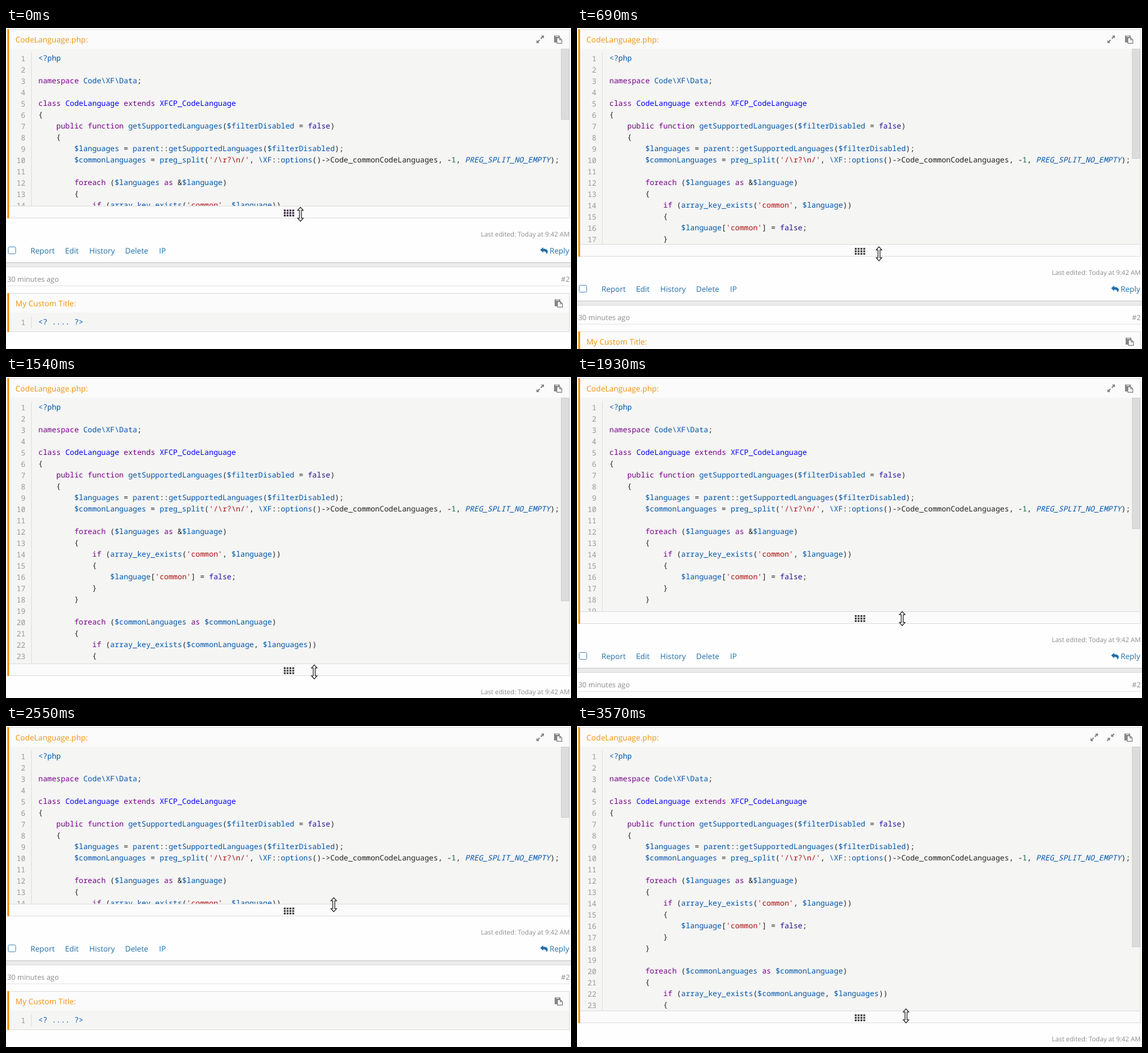
Animation of 899x511 px, one loop 3640 ms. Source, as an HTML page:

```html
<!DOCTYPE html>
<html lang="en">
<head>
<meta charset="utf-8">
<title>Resizable code block</title>
<style>
  html, body { margin: 0; width: 100%; height: 100%; overflow: hidden; background: #fefefe; }
  svg { display: block; width: 899px; height: 511px; }
  text { font-family: "Open Sans", "Noto Sans", sans-serif; text-rendering: geometricPrecision; white-space: pre; }
  .title { font-size: 12.4px; fill: #f2930d; }
  .link { font-size: 12.2px; fill: #1f6ea8; }
  .muted { font-size: 11.45px; fill: #8c8c8c; }
  .small { font-size: 10.4px; fill: #8c8c8c; }
  .end { text-anchor: end; }
  .code { font-family: "Noto Sans Mono", "DejaVu Sans Mono", monospace; font-size: 11.912px; fill: #222; }
  .number { fill: #999; text-anchor: end; }
  .keyword { fill: #708; }
  .string { fill: #a11; }
  .type { fill: #00f; }
  .atom { fill: #219; }
  .digit { fill: #164; }
  .variable { fill: #05a; }
  .constant { fill: #05a; font-style: italic; }
  .icon { fill: #858585; }
  .edge { fill: #dedede; }
  .head { fill: #fbfbfb; }
  .body { fill: #f5f5f4; }
  .accent { fill: #f2930d; }
</style>
</head>
<body>
<svg viewBox="0 0 899 511">
  <defs>
    <clipPath id="viewClip"><rect id="view" x="5" y="33" width="892" height="250"/></clipPath>
    <g id="outward">
      <path d="M6-6H1.2L6-1.2ZM-6 6H-1.2L-6 1.2Z"/>
      <path d="M1-1 4.5-4.5M-1 1-4.5 4.5" stroke="#858585" stroke-width="2"/>
    </g>
    <g id="inward">
      <path d="M.8-.8V-5.4L5.4-.8ZM-.8 .8V5.4L-5.4 .8Z"/>
      <path d="M2.5-2.5 5.5-5.5M-2.5 2.5-5.5 5.5" stroke="#858585" stroke-width="2"/>
    </g>
    <g id="paste">
      <path d="M-6-6H3V-3H-2V5H-6Z"/>
      <path d="M-4-4.6H1" stroke="#fbfbfb" stroke-width="1"/>
      <path d="M-1.4-2.4H3L6.4 1V6.4H-1.4ZM3-2.4V1H6.4" fill="#fbfbfb" stroke="#858585" stroke-width="1.2"/>
    </g>
  </defs>

  <rect class="edge" x="2" y="2" width="895" height="31"/>
  <rect class="head" x="5" y="3" width="891" height="30"/>
  <text class="title" x="15" y="23">CodeLanguage.php:</text>
  <g class="icon">
    <use id="expand" href="#outward" x="850" y="18"/>
    <use id="collapse" href="#inward" x="849" y="18"/>
    <use id="copy" href="#paste" x="878" y="18"/>
  </g>

  <g clip-path="url(#viewClip)">
    <rect class="body" x="5" y="33" width="891" height="478"/>
    <rect class="edge" x="896" y="33" width="1" height="478"/>
    <rect class="edge" x="40" y="39" width="1" height="472"/>
    <g id="listing"></g>
    <rect id="thumb" x="883.5" y="33.5" width="12" height="112" fill="#dcdcdc" stroke="#cfcfcf"/>
  </g>

  <g id="below">
    <rect class="edge" x="2" y="283" width="895" height="20"/>
    <rect class="head" x="5" y="284" width="891" height="18"/>
    <g id="grip"></g>
    <text class="small end" x="897" y="332">Last edited: Today at 9:42 AM</text>
    <rect x="3.5" y="348.5" width="12" height="11" rx="2" fill="#fff" stroke="#4f8fbe"/>
    <g class="link">
      <text x="39" y="359">Report</text>
      <text x="94" y="359">Edit</text>
      <text x="132.5" y="359">History</text>
      <text x="189.5" y="359">Delete</text>
      <text x="243.5" y="359">IP</text>
      <text x="865" y="359">Reply</text>
      <path d="M850 353.3 854.7 349V351.5C860 351.4 862 353.5 862 356 862 357.5 861 359 859.7 360 860.3 357 858.7 355.5 854.7 355.4V357.8Z"/>
    </g>
    <rect x="0" y="373" width="899" height="8" fill="#ebebeb"/>
    <rect x="0" y="373" width="899" height="1" fill="#c8c8c8"/>
    <rect x="0" y="380" width="899" height="1" fill="#dcdcdc"/>
    <text class="muted" x="2" y="404">30 minutes ago</text>
    <text class="muted end" x="897" y="404">#2</text>
    <rect x="2" y="410" width="895" height="1" fill="#e4e4e4"/>
    <rect class="edge" x="2" y="422" width="895" height="62"/>
    <rect class="head" x="5" y="423" width="891" height="30"/>
    <rect class="body" x="5" y="453" width="891" height="30"/>
    <rect class="edge" x="40" y="459" width="1" height="19"/>
    <rect class="accent" x="2" y="422" width="3" height="62"/>
    <text class="title" x="15" y="443">My Custom Title:</text>
    <use class="icon" href="#paste" x="879" y="438"/>
    <text class="code number" x="31" y="473">1</text>
    <text class="code variable" x="51.5" y="472">&lt;? .... ?&gt;</text>
  </g>
  <rect id="bar" class="accent" x="2" y="2" width="3" height="301"/>
  <path id="cursor" d="M0-11.2 4.4-6.3H1.6V6.3H4.4L0 11.2-4.4 6.3H-1.6V-6.3H-4.4Z" fill="#fff" stroke="#111" stroke-width="1.1"/>
</svg>

<script>
const LOOP = 3640, REST = 283, TOP = 33, CONTENT = 553, RELEASE = 3170;
const $ = id => document.getElementById(id);
const set = (id, attrs) => {
  for (const name in attrs) $(id).setAttribute(name, attrs[name]);
};

const source = String.raw`<?php

namespace Code\XF\Data;

class CodeLanguage extends XFCP_CodeLanguage
{
    public function getSupportedLanguages($filterDisabled = false)
    {
        $languages = parent::getSupportedLanguages($filterDisabled);
        $commonLanguages = preg_split('/\r?\n/', \XF::options()->Code_commonCodeLanguages, -1, PREG_SPLIT_NO_EMPTY);

        foreach ($languages as &$language)
        {
            if (array_key_exists('common', $language))
            {
                $language['common'] = false;
            }
        }

        foreach ($commonLanguages as $commonLanguage)
        {
            if (array_key_exists($commonLanguage, $languages))
            {
                $languages[$commonLanguage]['common'] = true;`;

const tokens = new RegExp([
  "(?<string>'[^']*')",
  "(?<keyword>\\b(?:namespace|class|extends|public|function|foreach|as|if)\\b)",
  "(?<constant>PREG_\\w+)",
  "(?<plain>Code_\\w+)",
  "(?<type>\\b(?:XFCP_)?CodeLanguage\\b)",
  "(?<atom>\\b(?:true|false)\\b)",
  "(?<digit>\\b\\d+)",
  "(?<variable><\\?php|[$\\\\\\w]+)"
].join("|"), "g");
const escapeHtml = s => s.replace(/&/g, "&amp;").replace(/</g, "&lt;").replace(/>/g, "&gt;");

function highlight(line) {
  let html = "", last = 0;
  for (const match of line.matchAll(tokens)) {
    const kind = Object.keys(match.groups).find(key => match.groups[key]);
    html += escapeHtml(line.slice(last, match.index)) +
      `<tspan class="${kind}">${escapeHtml(match[0])}</tspan>`;
    last = match.index + match[0].length;
  }
  return html + escapeHtml(line.slice(last));
}

$("listing").innerHTML = source.split("\n").map((line, i) => {
  const y = 52 + 18 * i;
  return `<text class="code number" x="31" y="${y + 1}">${i + 1}</text>` +
    `<text class="code" x="51.5" y="${y}">${highlight(line)}</text>`;
}).join("");

$("grip").innerHTML = Array.from({ length: 12 }, (_, i) =>
  `<rect x="${442 + i % 4 * 4.5}" y="${289 + Math.floor(i / 4) * 4}" width="3" height="3"/>`).join("");

// time, lower edge of the code view, cursor distance below that edge
const drag = [
  [0, 283, 13], [70, 283, 12],
  [450, 285, 15], [530, 299, 16], [610, 320, 16], [690, 344, 15], [760, 372, 15], [840, 398, 13], [910, 404, 10],
  [990, 385, 8], [1080, 354, 8], [1150, 342, 12], [1230, 354, 15], [1310, 384, 15], [1390, 416, 15], [1460, 441, 14],
  [1540, 456, 13], [1630, 460, 11], [1700, 450, 10], [1780, 431, 10], [1860, 404, 10], [1930, 373, 11], [2010, 334, 9],
  [2090, 301, 8], [2160, 283, 6], [2240, 283, 2], [2320, 283, 0], [2470, 283, 0], [2550, 283, 1],
  [2620, 283, 7], [2700, 288, 13], [2780, 311, 15], [2860, 347, 15], [2940, 389, 14], [3020, 430, 12], [3100, 450, 11],
  [3170, 453, 10], [3400, 453, 9], [3570, 453, 8]
];
const drift = [[0, 468], [450, 470], [690, 480], [1080, 493], [1540, 490], [1930, 517], [2550, 521], [3100, 523], [LOOP, 523]];

function cursorX(time) {
  const i = Math.max(1, drift.findIndex(key => key[0] >= time));
  const [t0, x0] = drift[i - 1], [t1, x1] = drift[i];
  return Math.round(x0 + (x1 - x0) * (time - t0) / (t1 - t0));
}

function draw(time) {
  const [at, edge, gap] = drag.findLast(step => step[0] <= time);
  const height = edge - TOP, released = time >= RELEASE;
  set("view", { height });
  set("thumb", { height: Math.round(height * height / CONTENT) - 1 });
  set("bar", { height: edge + 18 });
  set("below", { transform: `translate(0 ${edge - REST})` });
  set("cursor", { transform: `translate(${cursorX(at) + 0.5} ${edge + gap + 0.5})` });
  set("grip", { fill: time < 70 ? "#43304a" : "#484848" });
  set("expand", { x: released ? 823 : 850 });
  set("copy", { x: released ? 877 : 878 });
  set("collapse", { visibility: released ? "visible" : "hidden" });
}

const start = performance.now();
function frame() {
  draw((performance.now() - start) % LOOP);
  requestAnimationFrame(frame);
}
draw(0);
requestAnimationFrame(frame);
</script>
</body>
</html>
```
